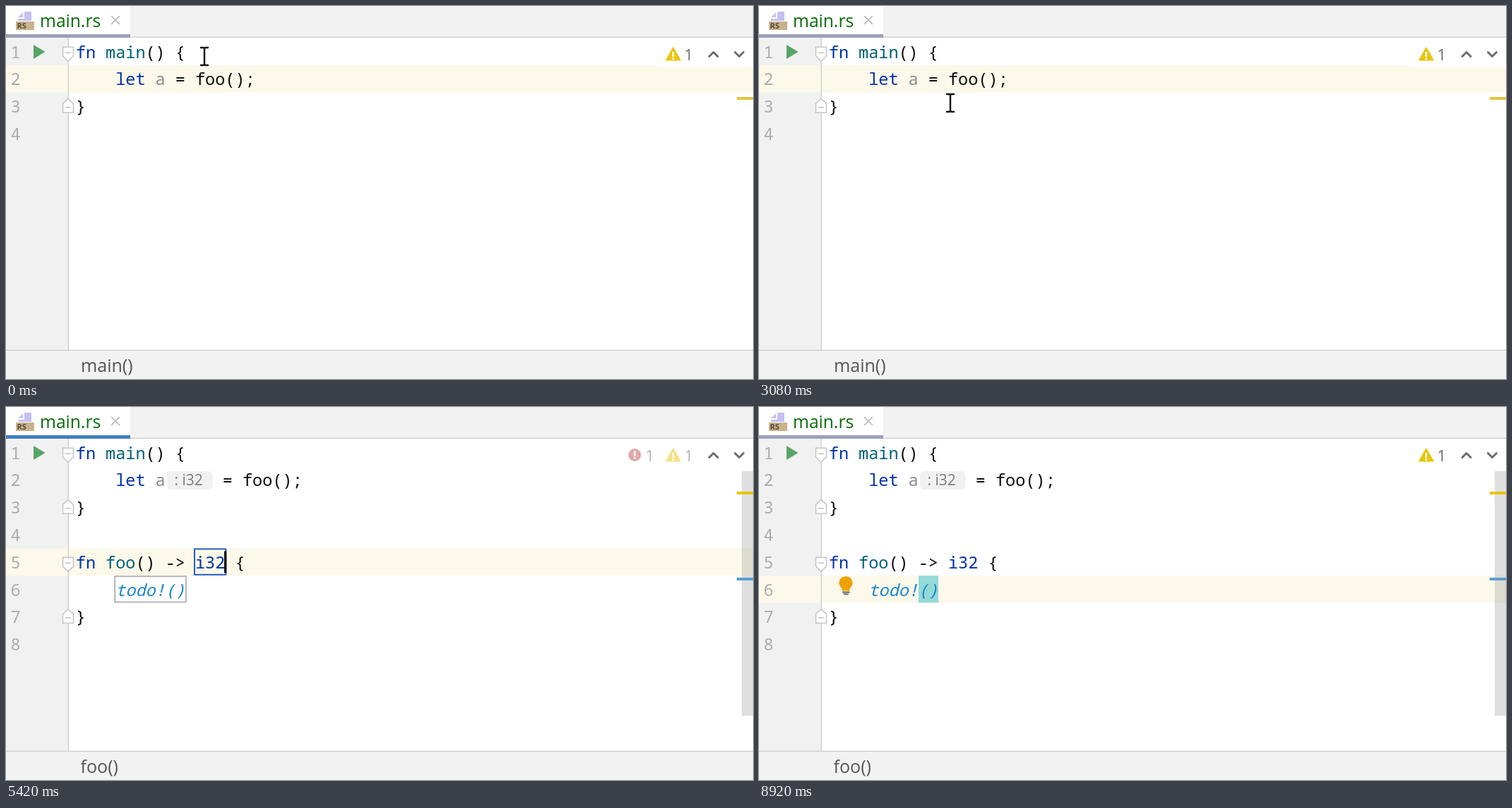
An HTML page for the animation above (9.01 s loop, 1058x529 px).

```html
<!DOCTYPE html>
<html lang="en">
<head>
<meta charset="utf-8">
<title>Editor</title>
<style>
  html, body { margin: 0; width: 100%; height: 100%; overflow: hidden; background: #fff; }
  svg { display: block; width: 100vw; height: 100vh; }
  text { white-space: pre; }
  .code { font: 23.5px "Noto Sans Mono", "DejaVu Sans Mono", monospace; fill: #0a0a0a; }
  .ui { font-family: "Open Sans", "Noto Sans", sans-serif; }
  .kw { fill: #0033a6; }
  .fn { fill: #00627a; }
  .dim { fill: #8c8c8c; }
  .num { fill: #adadad; }
  .todo { fill: #1a86cc; font-style: italic; }
  .bold { font-weight: 700; }
  .pre { fill: #2470b3; }
  .fold { fill: #fff; stroke: #c6c6c6; stroke-width: 1.6; }
  .line { fill: none; stroke-linecap: round; stroke-linejoin: round; }
  .pop { filter: drop-shadow(0 4px 5px rgba(0, 0, 0, .28)); }
</style>
</head>
<body>
<svg id="stage" viewBox="0 0 1058 529" preserveAspectRatio="none"></svg>
<script>
(() => {
const LOOP = 9010, END = 9999;
const X0 = 98.8, CW = 14.1, ROW = 38.8;

const colX = c => X0 + c * CW;
const rowY = n => 45.2 + (n - 1) * ROW;
const base = n => rowY(n) + 28.3;

const at = (times, ...parts) => `<g data-at="${times}">${parts.join('')}</g>`;
const rect = (x, y, w, h, fill, more = '') =>
  `<rect x="${x}" y="${y}" width="${w}" height="${h}" fill="${fill}" ${more}/>`;
const path = (d, more) => `<path d="${d}" ${more}/>`;
const ui = (x, y, size, fill, s) =>
  `<text class="ui" x="${x}" y="${y}" font-size="${size}" fill="${fill}">${s}</text>`;
const code = (n, col, s, cls = '', dx = 0) =>
  `<text class="code ${cls}" x="${colX(col) + dx}" y="${base(n)}">${s}</text>`;
const number = n => `<text class="code num" x="6.5" y="${base(n)}">${n}</text>`;
const band = n => rect(0, rowY(n), 1058, ROW, '#fcf8ea') + rect(87.5, rowY(n), 1.5, ROW, '#d2d2d2');
const caret = (n, col) => rect(colX(col) - 1.2, rowY(n) + 4, 3.2, 31, '#000');
const frame = (n, a, b, color) =>
  rect(colX(a) - 1, rowY(n) + 1, (b - a) * CW + 2, ROW - 2.4, 'none', `stroke="${color}" stroke-width="2"`);
const stripe = (y, color) => rect(1035, y - 2, 23, 4, color);

function foldMark(n, up) {
  const y = rowY(n) + (up ? 8.5 : 13);
  const d = up ? `M80.5 ${y + 20}V${y + 7}L88 ${y}L95.5 ${y + 7}V${y + 20}Z`
               : `M80.5 ${y}H95.5V${y + 12.5}L88 ${y + 20}L80.5 ${y + 12.5}Z`;
  const m = y + (up ? 12.5 : 8);
  return path(d, 'class="fold"') + path(`M84 ${m}H92`, 'class="fold"');
}

function bulb(n) {
  const y = rowY(n) + 13.5;
  return path(`M123 ${y - 12.5}a9.3 9.3 0 0 1 5.4 17v3.5h-10.8v-3.5a9.3 9.3 0 0 1 5.4-17Z`, 'fill="#eda200"') +
    rect(118, y + 9, 10.5, 1.8, '#555') + rect(119.5, y + 11.8, 7.5, 1.6, '#555');
}

const fileIcon = path('M17 16L24 9V16Z M26 8H36V21H17V18H26Z', 'fill="#c4c1f2"') +
  rect(14, 22, 26, 12, '#c9b28c') +
  '<text class="ui" x="15.5" y="32" font-size="11" font-weight="700" fill="#574a36">RS</text>';

const mark = (x, y) => rect(x - 1.3, y - 5, 2.6, 7, '#fff') + rect(x - 1.3, y + 3.4, 2.6, 2.6, '#fff');
const warning = path('M945 58.5L955.5 77H934.5Z', 'fill="#e9c40c" stroke="#e9c40c" stroke-linejoin="round"') +
  mark(945, 70) + ui(960.5, 76.5, 22.5, '#6b6b6b', '1');
const error = '<circle cx="890.5" cy="68" r="9" fill="#c75450"/>' +
  mark(890.5, 67.5) + ui(905.5, 76.5, 22.5, '#6b6b6b', '1');

const backdrop = [
  rect(0, 0, 1058, 529, '#fff'),
  rect(176, 0, 882, 43.5, '#f2f2f2'),
  rect(0, 45, 88, 443, '#f1f1f1'),
  rect(87.5, 45, 1.5, 443, '#d2d2d2'),
  rect(0, 43.5, 1058, 1.5, '#d1d1d1'),
  fileIcon,
  ui(48, 30, 24.6, '#0a6b0a', 'main.rs'),
  path('M149.5 14.5L160.5 25.5M160.5 14.5L149.5 25.5', 'class="line" stroke="#b4b4b4" stroke-width="1.6"'),
  rect(0, 40, 176, 5, '#9da1b9'),
  at('580-2250 3170-8920', rect(0, 40, 176, 5, '#4080c0'))
];

const footer = [
  rect(0, 488, 1058, 41, '#f2f2f2'),
  rect(0, 487.5, 1058, 1.5, '#d1d1d1'),
  at('0-3830', ui(106, 519, 25, '#555', 'main()')),
  at(`3830-${END}`, ui(105.5, 519, 25, '#555', 'foo()'))
];

const bands = [
  at('0-3170', band(2)),
  at('3170-5670', band(5)),
  at(`5670-${END}`, band(6)),
  rect(920, 46, 138, 41, '#fff')
];

const call = '= foo();';
const mainFn = [
  [1, 2, 3, 4].map(number).join(''),
  path('M39 55L55.5 65L39 75Z', 'fill="#57a566"'),
  foldMark(1), foldMark(3, true),
  code(1, 0, 'fn', 'kw'), code(1, 3, 'main', 'fn'), code(1, 7, '() {'),
  code(2, 4, 'let', 'kw'), code(2, 8, 'a', 'dim'),
  at('0-5420', code(2, 10, call)),
  at(`5420-${END}`,
    rect(228, 91, 64.5, 26, '#f1f1f1', 'rx="6"'),
    ui(238.5, 111, 21, '#7c7c7c', ': i32'),
    code(2, 10, call, '', 67)),
  code(3, 0, '}')
];

const typed = [['3170-4500', '_'], ['4500-4830', 'i'], ['4830-5000', 'i3'], ['5000-5250', 'i32'], [`5250-${END}`, 'i32', 'kw']];
const fooFn = at(`3170-${END}`,
  [5, 6, 7, 8].map(number).join(''),
  at(`3830-${END}`, foldMark(5), foldMark(7, true)),
  at('5670-6670', rect(colX(4), rowY(6), 7 * CW, ROW, '#a6d2ff')),
  at(`7170-${END}`, rect(226, rowY(6), 28, ROW - .5, '#93dad8')),
  code(5, 0, 'fn', 'kw'), code(5, 3, 'foo', 'fn'), code(5, 6, '() -&gt;'),
  ...typed.map(([t, s, cls]) => at(t, code(5, 12, s, cls), code(5, 13 + s.length, '{'))),
  code(6, 4, 'todo!()', 'todo'), code(7, 0, '}'),
  at('3170-4830', frame(5, 12, 13, '#2460c0')),
  at('4830-5000', frame(5, 12, 14, '#2460c0')),
  at('5000-5670', frame(5, 12, 15, '#2460c0')),
  at('3170-5670', frame(6, 4, 11, '#b4b4b4')),
  at('5670-6670', frame(5, 12, 15, '#b4b4b4'), frame(6, 4, 11, '#2460c0')));

const carets = [
  ['580-1080 1580-2080', 2, 14],
  ['3170-3670 4170-4830', 5, 13],
  ['4830-5000', 5, 14],
  ['5000-5670', 5, 15],
  ['5670-6170 6670-7170 7670-8170 8670-8920', 6, 11]
].map(([t, n, c]) => at(t, caret(n, c)));

const chevron = d => path(d, 'class="line" stroke="#6c6c6c" stroke-width="3"');
const inspections = [
  at('3670-5420', error),
  at('5420-5750', `<g opacity=".5">${error}${warning}</g>`),
  at(`0-5420 5750-${END}`, warning),
  chevron('M996 71.5L1002 65.5L1008 71.5'),
  chevron('M1032.5 65.5L1038.5 71.5L1044.5 65.5'),
  at('0-3170', stripe(131, '#dfc73f')),
  at(`3170-${END}`, rect(1042, 91, 16, 347, '#8c8c8c', 'fill-opacity=".28"'), stripe(122, '#eac500')),
  at('3670-5250', stripe(214, '#cd5a52')),
  at(`5420-${END}`, stripe(244, '#599fd3'))
];

const bulbs = [
  at('1580-3000', bulb(2)),
  at('2080-3000',
    rect(99.5, 74, 76.5, 48, 'none', 'stroke="#8f8f8f" stroke-width="1.5"'),
    path('M144 94H159L151.5 102Z', 'fill="#6e6e6e"')),
  at(`7420-${END}`, bulb(6))
];

const actions = at('2250-3000',
  rect(99.5, 122.5, 458, 81, '#f5f5f5', 'class="pop" stroke="#a8a8a8"'),
  rect(100, 123, 457, 39, '#2675bf'),
  ui(145, 150, 22.5, '#fff', 'Create function `foo`'),
  path('M538 135L546 142.5L538 150Z', 'fill="#fff"'),
  `<g transform="translate(0 45)">${bulb(2)}</g>`,
  ui(112, 190, 21, '#808080', 'Press Ctrl+Q to toggle preview'));

function completion(times, words, prefix) {
  const h = words.length * 35.2 + 46;
  const rows = words.map((w, i) =>
    `<text class="code bold" x="267" y="${264.5 + i * 35.2}"><tspan class="pre">${w.slice(0, prefix)}</tspan>${w.slice(prefix)}</text>`);
  const tip = 237 + h - 14;
  return at(times,
    rect(256.5, 237.5, 820, h, '#f5f5f5', 'class="pop" stroke="#9c9c9c" stroke-width="1.5"'),
    rect(257.5, 238.5, 820, 35, '#dedede'),
    ...rows,
    ui(275, tip, 21.8, '#7e7e7e', 'Ctrl+Down and Ctrl+Up will move caret down and up in the editor'),
    ui(950.5, tip, 21.8, '#2769b0', 'Next Tip'));
}

const lookups = [
  completion('4670-4830', ['i8', 'i16', 'i32', 'i64', 'i128', 'isize'], 1),
  completion('4830-5000', ['i32'], 2),
  completion('5000-5250', ['i32'], 3)
];

const beamPath = 'M-5 -12H-2Q0 -12 0 -10Q0 -12 2 -12H5M0 -10V11M-5 13H-2Q0 13 0 11Q0 13 2 13H5';
const mouse = `<g id="mouse">
  <g id="beam">${path(beamPath, 'class="line" stroke="#fff" stroke-width="5"')}${path(beamPath, 'class="line" stroke="#111" stroke-width="2.4"')}</g>
  <g id="arrow">${path('M0 -1V25L5.8 20L10 30.5L15 28.3L10.7 18.5H18Z', 'fill="#333" stroke="#fff" stroke-width="1.6"')}</g>
</g>`;

const stage = document.getElementById('stage');
stage.innerHTML = [backdrop, bands, mainFn, [fooFn], carets, inspections, bulbs, footer, [actions], lookups, [mouse]]
  .map(part => part.join('')).join('');

const timed = [...stage.querySelectorAll('[data-at]')].map(el => ({
  el, spans: el.dataset.at.split(' ').map(s => s.split('-').map(Number))
}));

// Pointer stops: time, x, y
const trips = [
  [[0, 281, 71], [330, 312, 94], [580, 298, 106], [920, 301, 106], [1170, 297, 103],
   [1670, 297, 103], [2080, 157, 92], [2170, 155, 90], [2580, 155, 92], [2920, 271, 137],
   [3170, 271, 137], [3670, 345, 152], [4170, 381, 159], [4500, 381, 159]],
  [[8080, 370, 158], [8330, 352, 96], [8580, 322, 14], [8670, 312, -35]]
];

function pointer(t) {
  const trip = trips.find(p => t >= p[0][0] && t < p[p.length - 1][0]);
  if (!trip) return null;
  const i = trip.findIndex(p => p[0] > t);
  const [t0, x0, y0] = trip[i - 1], [t1, x1, y1] = trip[i];
  const k = (t - t0) / (t1 - t0), e = k * k * (3 - 2 * k);
  return [x0 + (x1 - x0) * e, y0 + (y1 - y0) * e];
}

const [hand, beam, arrow] = ['mouse', 'beam', 'arrow'].map(id => document.getElementById(id));
const show = (el, on) => { el.style.display = on ? '' : 'none'; };

function draw(t) {
  for (const { el, spans } of timed) show(el, spans.some(([a, b]) => t >= a && t < b));
  const p = pointer(t);
  show(hand, p);
  if (!p) return;
  const pointing = p[1] < 44 || (t >= 2080 && t < 3000);
  hand.setAttribute('transform', `translate(${p[0].toFixed(1)} ${p[1].toFixed(1)})`);
  show(arrow, pointing);
  show(beam, !pointing);
}

// The screen refreshes twelve times a second, on 10 ms marks
const start = performance.now();
let last = -1;
function tick(now) {
  const t = Math.max(0, now - start) % LOOP;
  const step = Math.round(Math.floor((t + 4) * 12 / 1000) * 1000 / 120) * 10;
  if (step !== last) draw(last = step);
  requestAnimationFrame(tick);
}
draw(0);
requestAnimationFrame(tick);
})();
</script>
</body>
</html>
```
